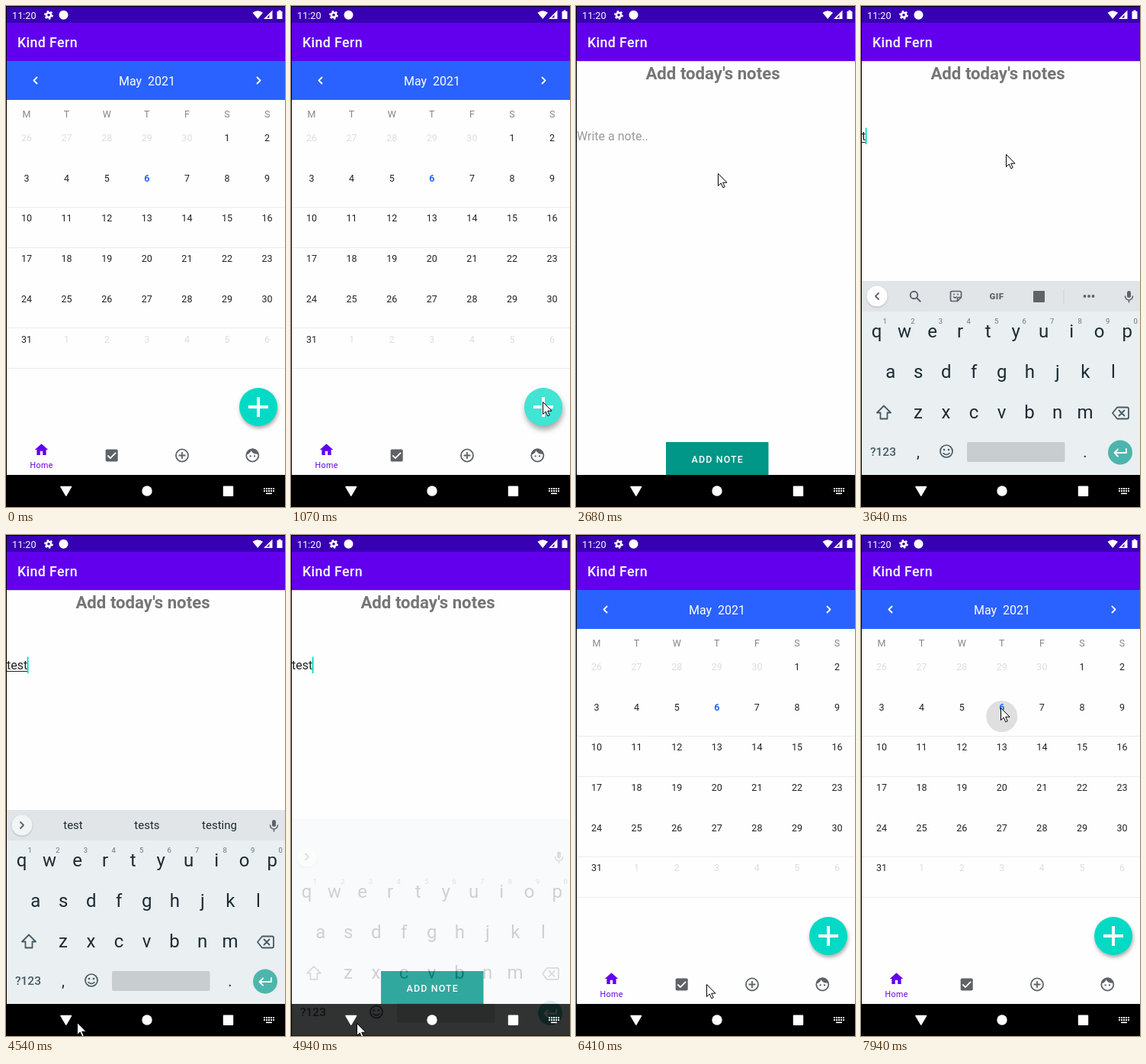
An HTML page for the animation above (8000 ms loop, 366 by 656 pixels).

```html
<!DOCTYPE html>
<html lang="en">
<head>
<meta charset="utf-8">
<title>Calendar notes</title>
<style>
  html, body { margin: 0; height: 100%; overflow: hidden; background: #000; }
  svg { display: block; width: 100vw; height: 100vh; font-family: Roboto, sans-serif; }
  .mid { text-anchor: middle; }
  .line { fill: none; stroke-linecap: round; stroke-linejoin: round; }
</style>
</head>
<body>
<svg id="stage" viewBox="0 0 366 656"></svg>
<script>
const LOOP = 8000;
const PURPLE = '#6200ee', TEAL = '#03dac5', GREY = '#5f6368', INK = '#1b2b33';

// Markup helpers
const rect = (x, y, w, h, fill, more = '') =>
  `<rect x="${x}" y="${y}" width="${w}" height="${h}" fill="${fill}" ${more}/>`;
const circle = (x, y, r, fill, more = '') =>
  `<circle cx="${x}" cy="${y}" r="${r}" fill="${fill}" ${more}/>`;
const ring = (x, y, r, stroke, width, more = '') =>
  circle(x, y, r, 'none', `stroke="${stroke}" stroke-width="${width}" ${more}`);
const path = (d, fill, more = '') => `<path d="${d}" fill="${fill}" ${more}/>`;
const line = (d, stroke, width, more = '') =>
  `<path class="line" d="${d}" stroke="${stroke}" stroke-width="${width}" ${more}/>`;
const text = (x, y, size, fill, str, more = '') =>
  `<text x="${x}" y="${y}" font-size="${size}" fill="${fill}" ${more}>${str}</text>`;
const label = (x, y, size, fill, str, more = '') =>
  text(x, y, size, fill, str, 'class="mid" ' + more);
const group = (id, body, more = '') => `<g id="${id}" ${more}>${body}</g>`;
// Places a 24-unit icon around a centre
const icon = (x, y, size, body) =>
  `<g transform="translate(${x - size / 2} ${y - size / 2}) scale(${size / 24})">${body}</g>`;

function appWindow(id, body) {
  return group(id,
    rect(0, 0, 366, 656, '#fefefe') +
    rect(0, 0, 366, 22, '#3700b3') +
    rect(0, 22, 366, 50, PURPLE) +
    text(15, 54, 17.8, '#fff', 'Kind Fern', 'font-weight="500" letter-spacing=".4"') +
    body + rect(0, 614, 366, 42, '#000'));
}

function calendar(weeks, dividers) {
  const column = i => 27 + 52.6 * i;
  let out = rect(0, 72, 366, 51, '#2962ff') +
    line('M40.5 93.5l-4 4 4 4M329.5 93.5l4 4-4 4', '#fff', 1.8) +
    label(185, 104, 16, '#fff', 'May&#160; 2021');
  for (const y of dividers) out += rect(0, y, 366, 1, '#ececec');
  [...'MTWTFSS'].forEach((d, i) => out += label(column(i), 145.7, 12.5, '#858585', d));
  for (let n = 0; n < weeks * 7; n++) {
    const day = n - 4, inMonth = day > 0 && day < 32;
    const number = day < 1 ? day + 30 : day > 31 ? day - 31 : day;
    const color = day === 6 ? '#2962ff' : inMonth ? '#222' : '#dedede';
    out += label(column(n % 7), 177 + 52.7 * Math.floor(n / 7), 12.5, color, number,
      day === 6 ? 'font-weight="700"' : '');
  }
  return out;
}

function bottomNav() {
  return icon(46.5, 581, 21, path('M10 20v-6h4v6h5v-8h3L12 3 2 12h3v8z', PURPLE)) +
    label(46.7, 605, 10.7, PURPLE, 'Home', 'letter-spacing=".4"') +
    icon(138.7, 588.5, 21.4, rect(3, 3, 18, 18, GREY, 'rx="2"') +
      line('M6 12l4 4 8-8', '#fff', 2, 'style="stroke-linecap:butt;stroke-linejoin:miter"')) +
    icon(231, 588.5, 21.4, ring(12, 12, 9, GREY, 2) + path('M11 7h2v4h4v2h-4v4h-2v-4H7v-2h4z', GREY)) +
    icon(323.3, 588.5, 21.4, ring(12, 12, 9, GREY, 2) + circle(9, 13, 1.3, GREY) + circle(15, 13, 1.3, GREY) +
      path('M3 11C7 10 9 8 10 5c2 4 6 5.500 11 5C20 5 17 2 12 2S3 6 3 11z', GREY));
}

function addButton() {
  return group('fab',
    circle(331, 525, 25, TEAL) + circle(331, 525, 25, '#fff', 'id="fabPress"') +
    path('M329 512h4v11h11v4h-11v11h-4v-11h-11v-4h11z', '#fff'));
}

function keyboard() {
  const row = (keys, x, y) =>
    [...keys].map((k, i) => label(x + 36.52 * i, y, 24, INK, k)).join('');
  const digits = [...'1234567890'].map((d, i) => label(31.5 + 36.52 * i, 416, 9.5, '#6b757a', d)).join('');
  const tools = circle(21, 380, 13.5, '#fff', 'style="filter:drop-shadow(0 1px 1px #0003)"') +
    line('M23 376l-4 4 4 4', GREY, 1.8) +
    ring(69.500, 378.5, 4.8, GREY, 1.9) + line('M73.2 382.2l4.5 4.5', GREY, 2) +
    line('M119.500 373.500h10a2 2 0 0 1 2 2v6l-5 5h-7a2 2 0 0 1-2-2v-9a2 2 0 0 1 2-2zM131.500 381.500h-3a2 2 0 0 0-2 2v3M121.500 381q2 2 4 0', GREY, 1.7) +
    circle(122, 377.5, 1, GREY) + circle(127, 377.5, 1, GREY) +
    label(178, 384.3, 11.5, GREY, 'GIF', 'font-weight="900" letter-spacing=".5"') +
    rect(226, 373, 15, 15, GREY, 'rx="1"') +
    rect(265.5, 371, 1, 19, '#ccd1d4') +
    [293.5, 299, 304.5].map(x => circle(x, 380, 1.9, GREY)).join('');
  const words = circle(21, 380, 13.500, '#f2f5f6', 'style="filter:drop-shadow(0 1px 1px #0003)"') +
    line('M19 376l4 4-4 4', GREY, 1.8) +
    [88, 185, 280].map(x => label(x, 385, 15, INK, '', 'data-word')).join('');
  return group('keyboard',
    rect(1, 360, 365, 254, '#eaeff1', 'id="keyboardBack"') +
    rect(1, 360, 365, 40, '#e1e5e8', 'id="strip"') +
    group('tools', tools) + group('words', words) +
    rect(349, 373, 5, 9, GREY, 'rx="2.5"') + line('M346.500 380a5 5 0 0 0 10 0M351.500 385v3', GREY, 1.6) +
    digits + row('qwertyuiop', 20.5, 434) + row('asdfghjkl', 38.7, 487) + row('zxcvbnm', 75, 540) +
    line('M30 523.500l9 9h-4.500v8h-9v-8H21z', '#455a64', 1.8) +
    line('M336 525.500h13a2 2 0 0 1 2 2v11a2 2 0 0 1-2 2h-13l-6-7.500zM338.500 529.500l7 7M345.500 529.500l-7 7', '#455a64', 1.8) +
    text(12, 589, 15.5, '#455a64', '?123', 'font-weight="500"') +
    label(75, 591, 20, INK, ',') + label(294, 591, 20, INK, '.') +
    ring(112, 583, 8, '#455a64', 1.700) + circle(109, 581, 1.3, '#455a64') + circle(115, 581, 1.3, '#455a64') +
    line('M108 585.500q4 4 8 0', '#455a64', 1.6) +
    rect(139, 571, 128.5, 26, '#c8cdd0', 'rx="2"') +
    circle(340, 584.500, 16, '#4db6ac') + line('M348 580v5h-15M337 580.500l-4.500 4.500 4.500 4.500', '#fff', 1.9));
}

function systemBars() {
  return text(8, 16.6, 12.7, '#fff', '11:20') +
    ring(56, 11.8, 3.1, '#fff', 2.6) + ring(56, 11.8, 4.9, '#fff', 2, 'pathLength="12" stroke-dasharray="1"') +
    circle(75.5, 11.8, 6, '#fff') +
    path('M323.500 8.800Q330 3.500 337 8.800L330.200 17z', '#fff') +
    path('M349.500 5.500V17H338zM348 9l-6 6.500h3.500V12z', '#fff', 'fill-rule="evenodd"') +
    path('M355.500 7h2V5.500h3V7h2v10h-7z', '#fff') +
    path('M72 629.500h13.500l-6.700 11.500z', '#fff', 'stroke="#fff" stroke-width="1.5" stroke-linejoin="round"') +
    circle(185, 635, 6.7, '#fff') + rect(284.8, 628.500, 13.4, 13.4, '#fff', 'rx="1"') +
    [632, 635].map(y => path(`M338 ${y}h14`, 'none', 'stroke="#fff" stroke-width="2" stroke-dasharray="2 1"')).join('') +
    rect(341, 637.5, 8, 1.6, '#fff');
}

document.getElementById('stage').innerHTML =
  appWindow('home', circle(184.7, 237.5, 0, '#dfdfdf', 'id="ripple"') +
    calendar(6, [263, 316, 421, 474]) + addButton() + bottomNav()) +
  appWindow('picker', calendar(5, [211, 263, 316, 369]) + rect(363.5, 158, 2.5, 191, '#a8a8a8', 'id="scrollbar"')) +
  appWindow('notes', rect(0, 72, 366, 1, '#dcdcdc') +
    label(179.5, 96.3, 22.2, '#757575', 'Add today\'s notes', 'font-weight="700"') +
    text(1, 176, 16, '#9a9a9a', 'Write a note..', 'id="hint"') +
    text(1, 176, 16, '#212121', '', 'id="typed"') +
    rect(1, 178, 0, 1, '#212121', 'id="underline"') +
    rect(1, 159.500, 1.8, 21.500, TEAL, 'id="caret"') +
    rect(118, 571, 134.5, 43, '#009688') + rect(118, 571, 134.5, 43, '#fff', 'id="buttonPress"') +
    label(185.7, 597.5, 12.5, '#fff', 'ADD NOTE', 'font-weight="500" letter-spacing="1.1"')) +
  keyboard() + systemBars() + path('M0 0H366V1H1V656H0z', '#000') +
  group('mouse', path('M.5 .5V16.500L4.200 13 6.800 18.800 9.200 17.700 6.700 12.200H12z', '#fff', 'stroke="#000"'));

const el = {};
document.querySelectorAll('[id]').forEach(e => el[e.id] = e);
const wordSlots = document.querySelectorAll('[data-word]');

const MOUSE = [
  [540, 267, 592], [860, 330, 518], [1290, 330, 518], [1610, 262, 244], [1850, 215, 203],
  [2190, 215, 203], [2440, 186, 219], [2960, 186, 219], [3130, 190, 194], [3680, 190, 194],
  [4240, 100, 637], [4400, 100, 637], [4700, 86, 639], [5150, 86, 639], [5600, 171, 588],
  [6420, 171, 588], [6550, 196, 571], [6700, 196, 571], [6960, 198, 573], [7170, 198, 573],
  [7620, 183, 226], [LOOP, 183, 226]
];
const KEY_TIMES = [3640, 3820, 4000, 4240];
const SUGGESTIONS = ['the to that', 'te tell text', 'tes test tested', 'test tests testing'];

const clamp = v => Math.min(1, Math.max(0, v));
const ramp = (t, start, length) => clamp((t - start) / length);
const fastOut = x => x < 1 / 6 ? .4 * (6 * x) ** 3 : 1 - .6 * Math.exp(-14 * (x - 1 / 6));
const set = (e, name, value) => e.setAttribute(name, value);
const fade = (e, value) => set(e, 'opacity', +value);
const zoom = (e, s) => set(e, 'transform', `translate(183 328) scale(${s}) translate(-183 -328)`);
const show = (e, on) => set(e, 'display', on ? 'inline' : 'none');

function drawMouse(t) {
  show(el.mouse, t >= 560);
  const i = Math.max(1, MOUSE.findIndex(k => k[0] > t));
  const [t0, x0, y0] = MOUSE[i - 1], [t1, x1, y1] = MOUSE[i];
  const p = ramp(t, t0, t1 - t0);
  set(el.mouse, 'transform', `translate(${Math.round(x0 + (x1 - x0) * p)} ${Math.round(y0 + (y1 - y0) * p)})`);
}

function drawWindows(t) {
  const open = fastOut(ramp(t, 1480, 400)), close = fastOut(ramp(t, 6090, 400));
  show(el.home, t < 1880 || t >= 6090);
  zoom(el.home, t < 4000 ? 1 + .05 * open : 1.05 - .05 * close);
  show(el.picker, t >= 1480 && t < 2680);
  zoom(el.picker, t < 1880 ? .85 + .15 * open : 1);
  fade(el.picker, ramp(t, 1530, 83));
  fade(el.scrollbar, 1 - ramp(t, 1700, 150));
  show(el.notes, t >= 2680 && t < 6300);
  zoom(el.notes, 1 - .1 * close);
  fade(el.notes, 1 - ramp(t, 6125, 83));

  const pressed = t < 4000 ? ramp(t, 1020, 50) : 0;
  fade(el.fabPress, .25 * pressed);
  el.fab.style.filter = `drop-shadow(1px ${3 + 2 * pressed}px ${2.5 + pressed}px #0005)`;
  fade(el.buttonPress, .2 * ramp(t, 5760, 110));
  set(el.ripple, 'r', 20.5 * ramp(t, 7850, 80));
}

function drawNote(t) {
  const count = KEY_TIMES.filter(k => t >= k).length;
  el.typed.textContent = 'test'.slice(0, count);
  const width = count ? el.typed.getComputedTextLength() : 0;
  show(el.hint, !count);
  set(el.underline, 'width', t < 4700 ? width : 0);
  set(el.caret, 'x', 1 + width - (count ? .5 : 0));
  show(el.caret, t >= 3150 && (t < 4700 || Math.floor((t - 4700) / 500) % 2 === 0));

  const suggesting = t >= 3700, hiding = t >= 4850;
  show(el.tools, !suggesting);
  show(el.words, suggesting);
  show(el.strip, !hiding);
  const words = count && t < 4700 ? SUGGESTIONS[count - 1].split(' ') : [];
  wordSlots.forEach((slot, i) => slot.textContent = words[i] || '');
}

function drawKeyboard(t) {
  const rise = ramp(t, 3180, 270), fall = ramp(t, 4850, 115);
  const shift = 45 * (1 - rise) ** 2 + 52.4 * fall;
  show(el.keyboard, rise > 0 && fall < 1);
  fade(el.keyboard, rise * (1 - fall));
  set(el.keyboard, 'transform', `translate(0 ${shift})`);
  set(el.keyboardBack, 'y', fall ? 330 : 360);
  set(el.keyboardBack, 'height', fall ? 284 : 254);
}

function frame() {
  const t = performance.now() % LOOP;
  drawWindows(t);
  drawNote(t);
  drawKeyboard(t);
  drawMouse(t);
  requestAnimationFrame(frame);
}
frame();
</script>
</body>
</html>
```
